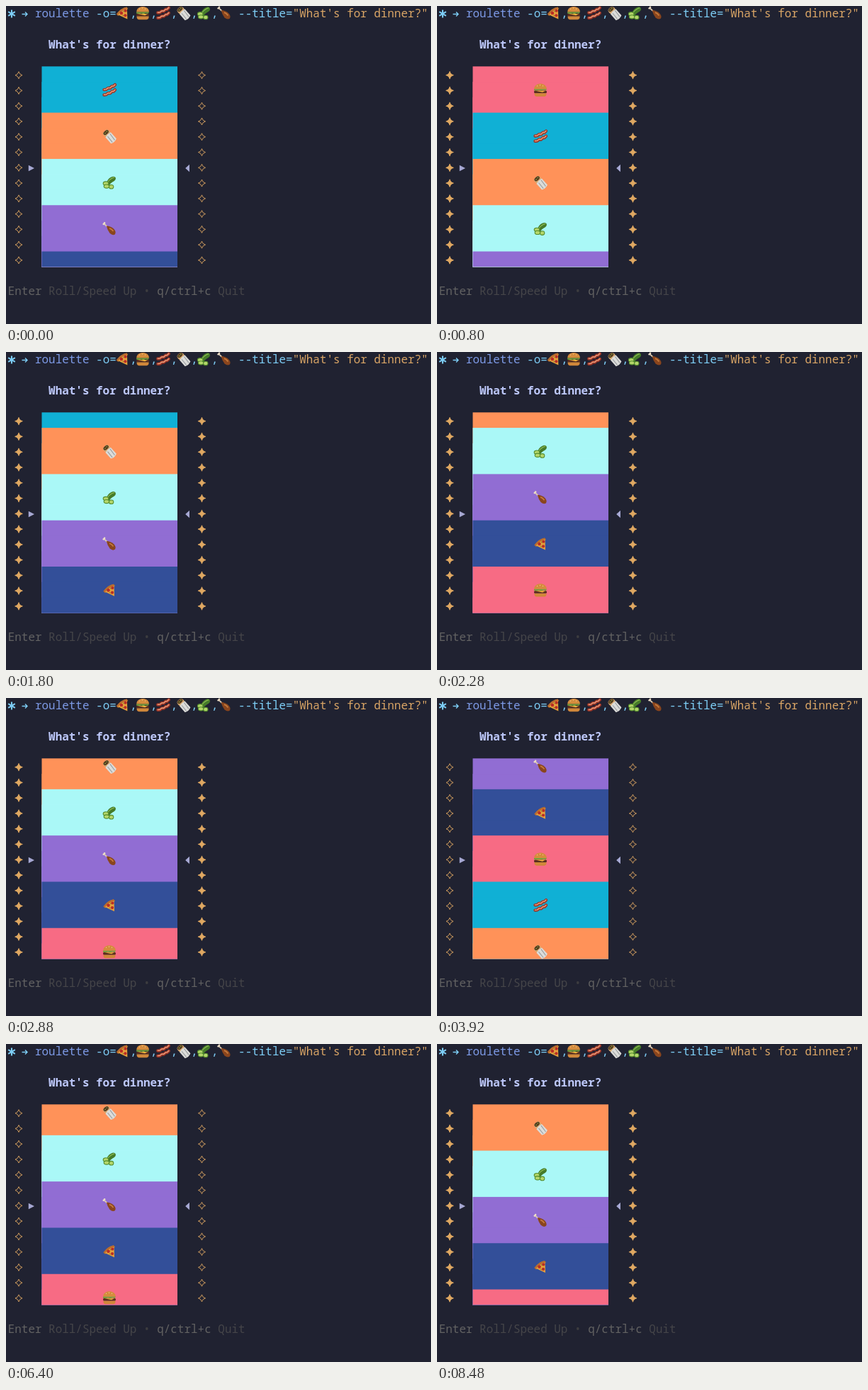
Animation of 600 by 449 pixels, one loop 8.52 s. Source, as an HTML page:

```html
<!DOCTYPE html>
<html lang="en">
<head>
<meta charset="utf-8">
<title>Roulette</title>
<style>
  html, body { margin: 0; width: 100%; height: 100%; overflow: hidden; background: #202231; }
  svg { display: block; width: 100vw; height: 100vh; }
  text { font: 300 15.95px "Noto Sans Mono", "DejaVu Sans Mono", monospace; white-space: pre; }
  .bold { font-weight: 700; }
</style>
</head>
<body>
<svg id="stage" viewBox="0 0 600 449" preserveAspectRatio="none">
  <defs>
    <g id="pizza">
      <path d="M-8.5 1.5Q-2-7 6-8.5L8-6Q1-3-6 4Z" fill="#bd7130"/>
      <path d="M-7 2Q-1-5 6.5-6.5L7 8.5Z" fill="#e5a03c"/>
      <path d="M-8.5 1.5Q-2-7.5 6-8.5L6.5-6.2Q-1-4.5-6.6 3Z" fill="#b96c2e"/>
      <g fill="#b92d25"><circle cx="-1.5" cy="0" r="2.3"/><circle cx="4.3" cy="-3.3" r="2.1"/><circle cx="4" cy="3.3" r="2.1"/></g>
      <path d="M1-3l1.5 1M0 3l1.5 1" stroke="#5d7a2c"/>
    </g>
    <g id="burger">
      <path d="M-8.8-1.5C-9-11.5 9-11.5 8.8-1.5Z" fill="#d58c3d"/>
      <path d="M-5-5.5l1-.5M-1-7h1M3-6l1 .4" stroke="#f5d9a6"/>
      <path d="M-9-1.5H9L7.5 .8 4 0 1 1.3-2 .2-5 1.3-9 .5Z" fill="#779f3c"/>
      <rect x="-9" y=".9" width="18" height="3.6" rx="1.6" fill="#5a2e1f"/>
      <path d="M-7 1H7L3 3.2Z" fill="#eeb53c"/>
      <path d="M-8.6 4.6H8.6Q8.5 9.2 5.5 9.2H-5.5Q-8.5 9.2-8.6 4.6Z" fill="#d0873a"/>
    </g>
    <g id="bacon" fill="none" stroke-linecap="round" stroke-linejoin="round">
      <g id="strip">
        <path d="M-7.5-.5l3-.3 2.5-2 3 0L3.5-5.2l2.2-.1L8-7.5" stroke="#9d3527" stroke-width="4.4"/>
        <path d="M-7.5-.7l3-.3 2.5-2 3 0L3.5-5.4l2.2-.1L8-7.7" stroke="#eda47f" stroke-width="1.4"/>
      </g>
      <use href="#strip" y="7.3"/>
    </g>
    <g id="burrito" transform="rotate(-42)">
      <rect x="-5" y="-10" width="10" height="9" rx="4" fill="#d5aa72"/>
      <ellipse cy="-7.2" rx="4.2" ry="2.6" fill="#54391f"/>
      <path d="M-2.5-7.5l2 .7M1-8l1.5 1" stroke="#88a03f" stroke-width="1.2"/>
      <path d="M-5.2-2.5L0-3.5 5.2-3V9Q0 11.5-5.2 9Z" fill="#dcdcd9"/>
      <path d="M-2-1.5L-2.5 9M3-2L2 9" stroke="#999da0" stroke-width="1.1"/>
    </g>
    <g id="cucumber">
      <path d="M-4 1Q-3-5 2-7.5Q7-10 8.7-7Q10-3.5 4-.5Q1 1 0 4Z" fill="#457b29"/>
      <path d="M-2-1Q1-5.5 7-7.3" fill="none" stroke="#88b650" stroke-width="1.3"/>
      <g fill="#b4d66b" stroke="#558d2e" stroke-width="1.1"><ellipse cx="-5" cy="1.2" rx="3.8" ry="2.6"/><ellipse cx="-4" cy="5.3" rx="3.8" ry="2.6"/><ellipse cx="2.6" cy="6" rx="3.2" ry="2.8"/></g>
    </g>
    <g id="drumstick">
      <path d="M-7.5-7.2L0 0" stroke="#dfcbb0" stroke-width="1.8"/>
      <circle cx="-8.2" cy="-6.7" r="1.3" fill="#eedfc7"/><circle cx="-6.9" cy="-8.2" r="1.3" fill="#eedfc7"/>
      <path d="M-4.3-4Q2-4 6.5 .5Q10 4.5 7.8 7.8Q4.5 10 .5 6.2Q-2.5 2.5-4.3-4Z" fill="#8a451d"/>
      <path d="M0-.8Q3.5 .2 5.5 3.5" fill="none" stroke="#c47a3c" stroke-width="1.8"/>
    </g>
  </defs>
</svg>
<script>
const stage = document.getElementById("stage");
const CELL = 9.57, ROW = 21.77, LEFT = 2.7, TOP = 85.3, ROWS = 13;
const LOOP = 8520, FRAME = 40;
const items = [
  ["pizza", "#334f99"], ["burger", "#f76b84"], ["bacon", "#10b0d5"],
  ["burrito", "#ff9259"], ["cucumber", "#aaf8f7"], ["drumstick", "#916dd3"]
];
const STRIP = items.length * 3;

function add(tag, attrs, text) {
  const node = document.createElementNS("http://www.w3.org/2000/svg", tag);
  for (const key in attrs) node.setAttribute(key, attrs[key]);
  if (text) node.textContent = text;
  return stage.appendChild(node);
}
const write = (col, y, fill, text, cls = "") =>
  add("text", { x: LEFT + col * CELL, y, fill, class: cls }, text);

// Command line
const CYAN = "#7dcdf5";
add("path", { d: "M8 5.5V16.5M3.2 8.2L12.8 13.8M3.2 13.8L12.8 8.2", stroke: CYAN, "stroke-width": 2.1 });
add("path", { d: "M22.5 11.5H30M27 8.5L30 11.5L27 14.5", stroke: CYAN, "stroke-width": 1.4, fill: "none" });
write(4, 16, "#7d9ae6", "roulette");
write(13, 16, CYAN, "-o=");
items.forEach(([name], i) => {
  add("use", { href: "#" + name, x: LEFT + (17 + i * 3) * CELL - 1, y: 10 });
  if (i < items.length - 1) write(18 + i * 3, 16, CYAN, ",");
});
write(34, 16, CYAN, "--title=");
write(42, 16, "#d9a566", '"What\'s for dinner?"');

write(6, 59.5, "#bdc8fa", "What's for dinner?", "bold");

// Help line
const KEY = "#626262", HINT = "#454549";
write(0, 407.5, KEY, "Enter");
write(6, 407.5, HINT, "Roll/Speed Up");
write(20, 407.5, "#3c3c3f", "•");
write(22, 407.5, KEY, "q/ctrl+c");
write(31, 407.5, HINT, "Quit");

// Wheel: each band reaches the bottom and the next one covers it
const bottom = TOP + ROWS * ROW;
const bands = [], icons = [], stars = [];
for (let i = 0; i < ROWS; i++) {
  const y = TOP + i * ROW;
  bands.push(add("rect", { x: 50.5, y, width: 191.5, height: bottom - y }));
}
for (let i = 0; i < ROWS; i++) {
  const mid = TOP + (i + 0.5) * ROW;
  icons.push(add("use", { x: 146, y: mid + 0.7 }));
  for (const x of [18, 276.5]) {
    stars.push(add("path", {
      d: "M0-5Q.9-.9 5 0Q.9.9 0 5Q-.9.9-5 0Q-.9-.9 0-5Z",
      transform: `translate(${x} ${mid + 1.5})`, stroke: "#dfa862", "stroke-linejoin": "round"
    }));
  }
}
add("path", { d: "M31.8 224.7L40 229L31.8 233.3ZM259 223.7V234.3L253.2 229Z", fill: "#a6a8d3" });

// Rows travelled: steady spin, then exponential slowing until it stops
function travelled(t) {
  const start = 120, brake = 3500, speed = 0.03125, drag = 0.0008;
  const steady = Math.max(0, Math.min(t, brake) - start) * speed;
  const slowing = t > brake ? speed / drag * (1 - Math.exp(-drag * (t - brake))) : 0;
  return Math.min(141, Math.floor(steady + slowing));
}

function draw(t) {
  const first = 6 - travelled(t) + STRIP * 8;
  for (let i = 0; i < ROWS; i++) {
    const slot = (first + i) % STRIP;
    const [name, color] = items[Math.floor(slot / 3)];
    bands[i].setAttribute("fill", color);
    icons[i].setAttribute("href", "#" + name);
    icons[i].setAttribute("visibility", slot % 3 === 1 ? "visible" : "hidden");
  }
  const lit = Math.floor(t / 242 + 0.05) % 2 === 1;
  for (const star of stars) {
    star.setAttribute("fill", lit ? "#dfa862" : "none");
    star.setAttribute("stroke-width", lit ? 1.2 : 0.9);
  }
}

const began = performance.now();
function tick() {
  const t = (performance.now() - began) % LOOP;
  draw(Math.floor(t / FRAME) * FRAME);
  requestAnimationFrame(tick);
}
draw(0);
requestAnimationFrame(tick);
</script>
</body>
</html>
```
